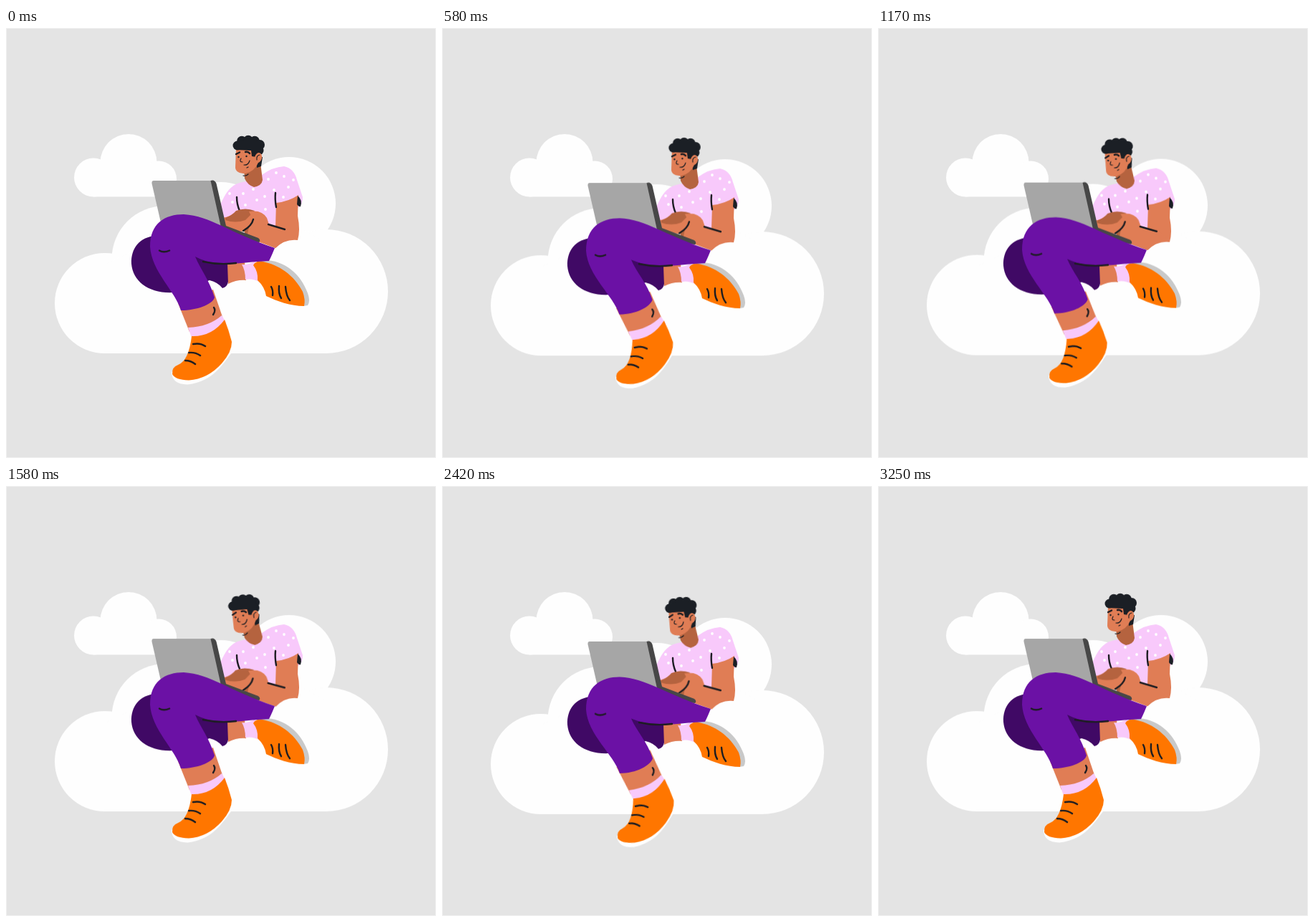
These frames come from a looping animation (600x600 px, 3.33 s). An HTML page:

```html
<!DOCTYPE html>
<html lang="en">
<head>
<meta charset="utf-8">
<title>Working on a cloud</title>
<style>
html, body { margin: 0; width: 100%; height: 100%; overflow: hidden; background: #e4e4e4; }
svg { display: block; width: 100vw; height: 100vh; }
.cloud { fill: #fefefe; }
.skin { fill: #e07d55; }
.shade { fill: #b5633f; }
.pink { fill: #f8c9fb; }
.orange { fill: #ff7600; }
.ink { fill: none; stroke: #1d1d22; stroke-width: 2.4; stroke-linecap: round; stroke-linejoin: round; }
.thin { stroke-width: 1.2; }
.hair { fill: #1b1f25; }

/* Two bobs and one nod per loop of 3330 ms */
.bob, .shin, .pants, .knee {
  animation: bob 832.5ms cubic-bezier(.37, 0, .63, 1) infinite alternate;
}
.shin { transform-origin: 285px 350px; }
.shin, .pants, .knee { animation-delay: -50ms; }
.shin { animation-name: swing; }
.pants { animation-name: bend; }
.knee { animation-name: drop; }
.head { transform-origin: 345px 212px; animation: nod 3330ms linear infinite; }
.hands { transform-origin: 400px 288px; animation: type 333ms cubic-bezier(.37, 0, .63, 1) infinite alternate; }

@keyframes bob { to { transform: translateY(4px); } }
@keyframes swing { to { transform: rotate(-5.6deg); } }
@keyframes drop { to { transform: translateY(3.5px); } }
@keyframes type { to { transform: rotate(-1.8deg); } }
@keyframes nod {
  0%, 14% { transform: rotate(0deg); animation-timing-function: cubic-bezier(.37, 0, .63, 1); }
  45%, 67% { transform: rotate(-8deg); animation-timing-function: cubic-bezier(.37, 0, .63, 1); }
  87%, 100% { transform: rotate(0deg); }
}
@keyframes bend {
  from { d: path("M201,305 C201,272 222,260 248,260 C285,262 312,286 375,307 C372,314 370,319 367,325 C340,326 315,331 290,328 C278,326 271,322 264,319 C272,338 284,352 291,376 C288,386 266,394 244,394 C237,368 203,340 201,305 Z"); }
  to { d: path("M201,308 C201,275 222,262.5 248,262.5 C285,264 312,287 375,307 C372,314 370,319 367,325 C340,326 315,331 290,328 C278,326 271,323 264,320.5 C272,339 286,352 294,376 C291,386 271,397 248,397 C240,371 203,343 201,308 Z"); }
}
</style>
</head>
<body>
<svg viewBox="0 0 600 600">
  <rect width="600" height="600" fill="#e4e4e4"/>
  <rect x=".5" y=".5" width="599" height="599" fill="none" stroke="#f1f1f1"/>

  <g class="cloud">
    <circle cx="122" cy="208.5" r="27"/>
    <circle cx="171" cy="187.5" r="39.5"/>
    <circle cx="213" cy="210.5" r="25"/>
    <rect x="122" y="200" width="91" height="35.5"/>
  </g>

  <g class="bob">
    <g class="cloud">
      <circle cx="138" cy="384" r="70"/>
      <circle cx="222" cy="322.5" r="74.5"/>
      <circle cx="300" cy="281" r="66"/>
      <circle cx="395" cy="245" r="65"/>
      <circle cx="446.5" cy="367.5" r="86.5"/>
      <path d="M138,454 V330 L222,290 L395,270 L447,300 V454 Z"/>
    </g>

    <!-- far leg -->
    <path fill="#400965" d="M210,290 C186,291 174,308 175,329 C177,354 200,371 234,369 L284,352 Q296,355 302,363 Q309,361 310,354 L313,326 L264,315 Z"/>
    <path class="skin" d="M309,329 L333,326 L335,352 Q322,351 310,357 Z"/>
    <path class="pink" d="M329,330 Q339,331 347,325 Q354,338 353,354 Q344,349 334,351 Q334,338 329,330 Z"/>
    <path fill="#c9c9c9" d="M352,324 C388,321 411,343 421,370 Q425,381 421,387 L415,388 L380,340 Z"/>
    <path class="orange" d="M345,331 Q348,325 356,325.500 C381,330 402,345 414,368 Q418,379 416,388 C397,388 378,381 363,374 Q361,361 351,352 Q352,340 345,331 Z"/>
    <path class="ink" d="M370,361 Q373,366 372,373 M381,360 Q380,371 384,377 M390,361 Q391,374 396,380"/>

    <!-- torso -->
    <path class="pink" d="M299,247 C306,230 314,219 326,216 Q345,212 357,205 Q372,194 388,193 Q402,196 406,212 L414,236 Q414,247 407,251 L390,285 L345,285 L304,270 Z"/>
    <g fill="#fff" id="dots"></g>
    <path class="skin" d="M377,244 Q395,242 408,233 L407,262 Q411,282 407,296 Q389,294 376,307 L352,298 L366,274 L376,277 Z"/>
    <path class="hair" d="M407,234 Q414,240 411,249 Q408,250 406,246 Z"/>
    <path class="ink" d="M376,230 Q375,239 377,250 M322,236 Q322,246 326,255"/>

    <g class="hands">
      <path class="shade" d="M328,274 L345,268 L342,292 L335,290 Z"/>
      <path class="skin" d="M302,265 Q314,263 321,256 Q340,252 347,258 L344,270 Q338,279 329,284 L303,278 Z"/>
      <path class="shade" d="M306,265 Q315,262 321,255 Q334,250 347,255 Q340,262 334,268 Q320,273 306,268 Z"/>
      <path class="skin" d="M339,256 Q357,253 364,265 L367,274 Q380,279 391,280 L405,294 Q388,295 376,307 L352,298 L337,292 Q336,281 345,268 Z"/>
      <path class="ink" d="M345,267 Q343,276 331,283 M366,274 L389,281"/>
    </g>

    <g class="head">
      <path class="shade" d="M332,197 L355,188 L358,212 Q357,220 346,222 Q337,219 333,210 Z"/>
      <path class="hair" d="M349,180 L358,180 L356,193 L350,195 Z"/>
      <path class="skin" d="M321,168 L320,195 Q321,203 334,203 Q347,200 352,188 L355,170 Z"/>
      <path class="ink thin" d="M331,206 Q335,207 338,204"/>
      <g class="hair">
        <circle cx="323" cy="164" r="6.500"/>
        <circle cx="329" cy="157.500" r="6.800"/>
        <circle cx="338" cy="156.500" r="6.800"/>
        <circle cx="347" cy="157.500" r="6.800"/>
        <circle cx="354" cy="163" r="7"/>
        <circle cx="353" cy="171" r="6.500"/>
        <path d="M322,160 L338,153 L356,162 L355,178 L349,180 L343,179 L342,171 L322,170 Z"/>
      </g>
      <ellipse class="skin" cx="352" cy="181" rx="5" ry="7" transform="rotate(15 352 181)"/>
      <path class="ink thin" d="M350,184 Q349,178 354,177 M328,182 Q325,187 330,187 M332,191 Q338,192 340,185 M336,195 L338,194"/>
      <path class="ink" stroke-width="1.800" d="M321,176 L326,173.500 M334,173 Q338,172 340,175"/>
      <circle class="hair" cx="324.500" cy="180" r="1.200"/>
      <circle class="hair" cx="335.500" cy="179" r="1.200"/>
    </g>

    <!-- laptop -->
    <path fill="#a6a6a6" d="M206,213 H288 L303,280 H218 L203.500,217 Q203,213 206,213 Z"/>
    <path fill="#474747" d="M285.500,213 Q291,211 293.500,217 L307,276 L352,293 Q356,296 353,299 L340,298 L300,278 Z"/>

    <!-- near leg -->
    <g class="shin">
      <path class="skin" d="M240,384 L289,365 L303,406 L256,424 Z"/>
      <path class="ink" d="M290,390 Q293,394 289,400"/>
      <path class="pink" d="M254,418 Q283,417 301,401 L307,411 Q286,434 259,432 Z"/>
      <path class="cloud" d="M231,480 Q231,497 253,497.500 C284,494 298,476 314,454 L315,440 L250,470 Z"/>
      <path class="orange" d="M259,430 Q287,431 305,407 Q311,422 315,438 Q315,452 301,468 Q281,490 255,491.500 Q236,491 232,483 Q231,473 240,470 Q255,464 259,430 Z"/>
      <path class="ink" d="M261,441 Q271,439 278,444 M255,453 Q264,452 271,457 M250,464 Q258,464 264,469"/>
    </g>
    <path class="pants" fill="#6b11a5" d=""/>
    <path class="ink" d="M275,326 Q298,331 321,328"/>
    <path class="ink knee" d="M214,310.500 Q220,314 228,310.500"/>
  </g>
</svg>
<script>
const dots = [[366, 211], [388, 207], [361, 235], [374, 226], [345, 225], [350, 240], [331, 231],
  [334, 247], [316, 243], [394, 222], [401, 212], [312, 231], [362, 253], [387, 236], [377, 202]];
document.getElementById('dots').innerHTML =
  dots.map(([x, y]) => `<circle cx="${x}" cy="${y}" r="1.9"/>`).join('');
</script>
</body>
</html>
```
